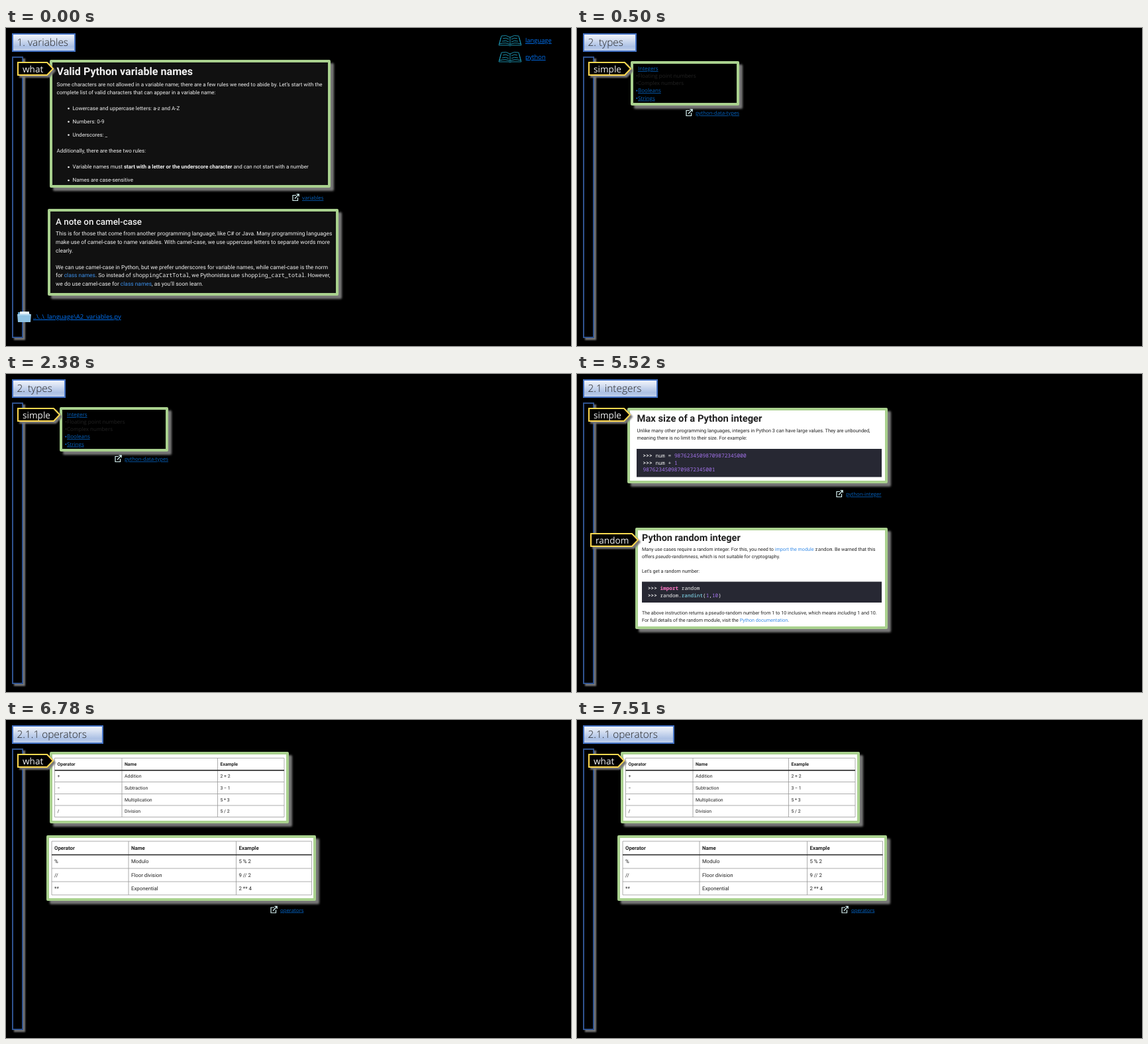
Animation, 853 px wide and 480 px high, one loop 8 s. Source, as an HTML page:

```html
<!DOCTYPE html>
<html lang="en">
<head>
<meta charset="utf-8">
<title>Python notes</title>
<style>
  html, body { margin: 0; width: 100%; height: 100%; overflow: hidden; background: #000; }
  svg { display: block; width: 100%; height: 100%; }
  text { font-family: Roboto, sans-serif; text-rendering: geometricPrecision; }
  .ui { font-family: "Open Sans", sans-serif; }
  .title { font-weight: 300; fill: #222; }
  .link { fill: #0563c1; text-decoration: underline; }
  .bright { fill: #0070f0; }
  .b { font-weight: 700; }
  .m { font-weight: 500; }
  .i { font-style: italic; }
  .mono { font-family: "Noto Sans Mono", monospace; }
  .light { fill: #f2f2f2; }
  .dark { fill: #222; }
  .ref { fill: #3b8ee8; }
  .num { fill: #a574ee; }
  .key { fill: #ff79c6; font-weight: 700; }
  .fn { fill: #8be9fd; }
  .shadow { filter: drop-shadow(5px 5px 1.5px #777); }
  .soft { filter: drop-shadow(3px 3px 1px #777); }
</style>
</head>
<body>
<svg id="stage" viewBox="0 0 853 480">
  <defs>
    <linearGradient id="sky" x2="0" y2="1">
      <stop stop-color="#f6f8fc"/>
      <stop offset=".74" stop-color="#abc0e4"/>
      <stop offset="1" stop-color="#c7d5ed"/>
    </linearGradient>
  </defs>
</svg>
<script>
const text = (x, y, size, cls, content) =>
  `<text x="${x}" y="${y}" font-size="${size}" class="${cls}">${content}</text>`;
const span = (cls, content) => `<tspan class="${cls}">${content}</tspan>`;
const rect = (x, y, right, bottom, attrs) =>
  `<rect x="${x}" y="${y}" width="${right - x}" height="${bottom - y}" ${attrs}/>`;
const path = (d, attrs) => `<path d="${d}" ${attrs}/>`;

const lines = (x, size, cls, rows) =>
  rows.map(([y, content]) => text(x, y, size, cls, content)).join('');

const header = (right, title) =>
  rect(10, 9, right - 1, 35, 'fill="url(#sky)" stroke="#4472c4" stroke-width="2"') +
  text(16.5, 27, 15.4, 'ui title', title) +
  rect(10, 44, 25, 467, 'fill="#000" stroke="#2f528f" stroke-width="2" class="soft"');

const card = (x, y, right, bottom, fill) =>
  rect(x + 2, y + 2, right - 2, bottom - 2,
    `fill="${fill}" stroke="#a9d18e" stroke-width="4" stroke-linejoin="round" class="shadow"`);

const tag = (x, y, tip, label) =>
  path(`M${x + 1} ${y + 1}H${tip - 10}L${tip - 1} ${y + 10.5}L${tip - 10} ${y + 20}H${x + 1}Z`,
    'fill="#000" stroke="#ffd94f" stroke-width="2" class="soft"') +
  text(x + 8, y + 16, 13.6, 'ui light', label);

const source = (x, y, linkX, label) =>
  path(`M${x + 6} ${y + 2.5}H${x + 1}V${y + 10.5}H${x + 8.5}V${y + 6}` +
    `M${x + 4} ${y + 7.5}L${x + 10} ${y + 1}M${x + 6.5} ${y + .8}H${x + 10.2}V${y + 4.5}`,
    'fill="none" stroke="#d8f4f4" stroke-width="1.2"') +
  text(linkX, y + 9, 7.75, 'ui link', label);

const book = (y, label) =>
  path(`M761 ${y + 4}Q755 ${y} 748 ${y + 2}L745 ${y + 14}Q755 ${y + 11} 761 ${y + 15}` +
    `Q767 ${y + 11} 777 ${y + 14}L774 ${y + 2}Q767 ${y} 761 ${y + 4}V${y + 15}` +
    `M747 ${y + 5}L744 ${y + 16}H759L761 ${y + 17}L763 ${y + 16}H778L775 ${y + 5}` +
    `M750 ${y + 6}Q755 ${y + 4} 759 ${y + 7}M749 ${y + 10}Q755 ${y + 8} 759 ${y + 11}` +
    `M772 ${y + 6}Q767 ${y + 4} 763 ${y + 7}M773 ${y + 10}Q767 ${y + 8} 763 ${y + 11}`,
    'fill="none" stroke="#1b8ba6"') +
  text(784, y + 12, 9.35, 'ui link bright', label);

const folder =
  path('M18 429H25L27 431H36V443H18Z', 'fill="#5f9fc9"') +
  path('M21 428H35V440H21Z', 'fill="#e4f2fa"') +
  path('M17 432H38L37 444H18Z', 'fill="#8fc3e3"') +
  path('M18 433H37', 'stroke="#c5e3f4"');

// The second entry of ys is the heavy line below the column names.
const table = (xs, ys, size, rows) => {
  const [left, right, top, bottom] = [xs[0], xs.at(-1), ys[0], ys.at(-1)];
  const grid = xs.map(x => `M${x} ${top}V${bottom}`).join('') +
    ys.map(y => `M${left} ${y}H${right}`).join('');
  return path(grid, 'stroke="#999" stroke-width=".8"') +
    path(`M${left} ${ys[1]}H${right}`, 'stroke="#222" stroke-width="1.4"') +
    rows.map((row, r) => row.map((cell, c) =>
      text(xs[c] + 4, (ys[r] + ys[r + 1]) / 2 + size * .35, size, r ? 'dark' : 'dark b', cell)
    ).join('')).join('');
};

const prompt = span('b', '&gt;&gt;&gt;') + ' ';
const bullets = ys => ys.map(y => `<circle cx="94.5" cy="${y}" r="1.3" fill="#f2f2f2"/>`).join('');

const variables = header(105, '1. variables') +
  book(10, 'language') + book(35, 'python') +
  card(66, 48, 490, 241, '#111') +
  text(76.5, 70.7, 16.1, 'light b', 'Valid Python variable names') +
  lines(76.5, 8.03, 'light', [
    [87.5, 'Some characters are not allowed in a variable name; there are a few rules we need to abide by. Let’s start with the'],
    [99.5, 'complete list of valid characters that can appear in a variable name:'],
    [187.7, 'Additionally, there are these two rules:']
  ]) +
  bullets([121.5, 141.5, 161.5, 210, 230]) +
  lines(100.5, 8.03, 'light', [
    [123.7, 'Lowercase and uppercase letters: a-z and A-Z'],
    [143.7, 'Numbers: 0-9'],
    [163.7, 'Underscores: _'],
    [212.3, `Variable names must ${span('b', 'start with a letter or the underscore character')} and can not start with a number`],
    [232.3, 'Names are case-sensitive']
  ]) +
  tag(17, 51, 72, 'what') +
  source(432, 250, 447, 'variables') +
  card(63, 273, 502, 404, '#111') +
  text(75, 296.7, 13.4, 'light m', 'A note on camel-case') +
  lines(75, 8.44, 'light', [
    [313.4, 'This is for those that come from another programming language, like C# or Java. Many programming languages'],
    [326, 'make use of camel-case to name variables. With camel-case, we use uppercase letters to separate words more'],
    [338.6, 'clearly.'],
    [363.8, 'We can use camel-case in Python, but we prefer underscores for variable names, while camel-case is the norm'],
    [376.4, `for ${span('ref', 'class names')}. So instead of ${span('mono', 'shoppingCartTotal')}, we Pythonistas use ${span('mono', 'shopping_cart_total')}. However,`],
    [389, `we do use camel-case for ${span('ref', 'class names')}, as you’ll soon learn.`]
  ]) +
  folder +
  text(41, 439, 9.45, 'ui link bright', '..\\..\\_language\\A2_variables.py');

const types = header(90, '2. types') +
  card(81, 50, 245, 117, '#000') +
  tag(17, 51, 82, 'simple') +
  lines(92, 8.05, 'ui link', [[64, 'Integers'], [97.2, 'Booleans'], [108.6, 'Strings']]) +
  lines(89, 8.05, 'ui dark', [[75.2, '•Floating point numbers'], [86.2, '•Complex numbers']]) +
  [94.6, 106].map(y => `<circle cx="90.3" cy="${y}" r="1.1" fill="#0563c1"/>`).join('') +
  source(164, 122, 179, 'python-data-types');

const integers = header(122, '2.1 integers') +
  card(76, 51, 469, 165, '#fff') +
  tag(17, 51, 81, 'simple') +
  text(90.5, 72.2, 14.75, 'dark b', 'Max size of a Python integer') +
  lines(90.5, 7.36, 'dark', [
    [87.6, 'Unlike many other programming languages, integers in Python 3 can have large values. They are unbounded,'],
    [98.8, 'meaning there is no limit to their size. For example:']
  ]) +
  rect(90, 113, 460, 155.5, 'fill="#272833"') +
  lines(99.5, 7.9, 'light mono', [
    [126.2, `${prompt}num = ${span('num', '98762345098709872345000')}`],
    [136.8, `${prompt}num + ${span('num', '1')}`],
    [147.4, span('num', '98762345098709872345001')]
  ]) +
  source(391, 175, 406, 'python-integer') +
  card(88, 232, 469, 385, '#fff') +
  tag(20, 240, 93, 'random') +
  text(98, 251.8, 14.45, 'dark b', 'Python random integer') +
  lines(98, 7.2, 'dark', [
    [267.4, `Many use cases require a random integer. For this, you need to ${span('ref', 'import the module')} ${span('mono', 'random')}. Be warned that this`],
    [278, `offers ${span('i', 'pseudo-randomness')}, which is not suitable for cryptography.`],
    [299.6, 'Let’s get a random number:'],
    [362.8, `The above instruction returns a pseudo-random number from 1 to 10 inclusive, which means ${span('i', 'including')} 1 and 10.`],
    [373.8, `For full details of the random module, visit the ${span('ref', 'Python documentation')}.`]
  ]) +
  rect(98, 313.5, 460, 345, 'fill="#272833"') +
  lines(107, 7.7, 'light mono', [
    [326.3, `${prompt}${span('key', 'import')} random`],
    [336.8, `${prompt}random.${span('fn', 'randint')}(${span('num', '1')},${span('num', '10')})`]
  ]);

const columns = ['Operator', 'Name', 'Example'];
const operators = header(147, '2.1.1 operators') +
  card(66, 48, 427, 156, '#fff') +
  tag(17, 51, 72, 'what') +
  table([73.5, 175, 319.5, 420], [57.5, 76, 93.5, 111.5, 129, 146.5], 6.9, [
    columns,
    ['+', 'Addition', '2 + 2'],
    ['−', 'Subtraction', '3 − 1'],
    ['*', 'Multiplication', '5 * 3'],
    ['/', 'Division', '5 / 2']
  ]) +
  card(61, 174, 468, 273, '#fff') +
  table([69, 185, 347.5, 461.5], [183, 203.5, 224, 244, 264], 7.85, [
    columns,
    ['%', 'Modulo', '5 % 2'],
    ['//', 'Floor division', '9 // 2'],
    ['**', 'Exponential', '2 ** 4']
  ]) +
  source(399, 280.5, 414, 'operators');

const stage = document.getElementById('stage');
stage.insertAdjacentHTML('beforeend',
  [variables, types, integers, operators].map(s => `<g class="slide">${s}</g>`).join(''));
const slides = [...stage.querySelectorAll('.slide')];
const ends = [500, 3640, 6780, 8000];

function draw() {
  const t = performance.now() % 8000;
  const current = ends.findIndex(end => t < end);
  slides.forEach((slide, i) => { slide.style.display = i === current ? '' : 'none'; });
  requestAnimationFrame(draw);
}
draw();
</script>
</body>
</html>
```
